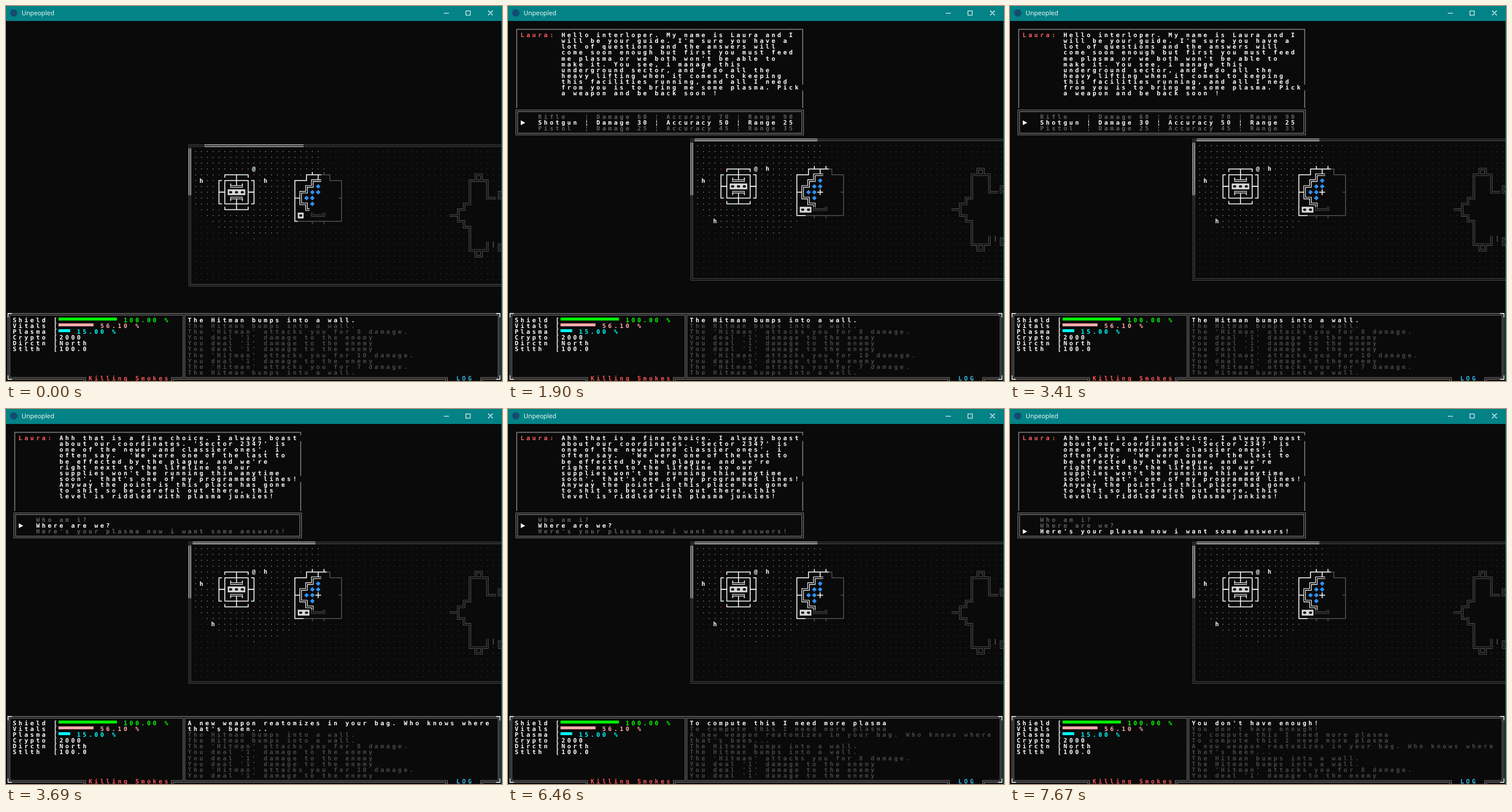
Write an HTML page that moves like this. It is 860x651 px and loops after 8 s.

```html
<!DOCTYPE html>
<html lang="en">
<head>
<meta charset="utf-8">
<title>Unpeopled</title>
<style>
  html, body { margin: 0; width: 100%; height: 100%; overflow: hidden; background: #0a0a0a; }
  svg { display: block; width: 860px; height: 651px; }
  text {
    font: bold 10.5px "DejaVu Sans Mono", "Liberation Mono", monospace;
    letter-spacing: 3.797px;
    white-space: pre;
    text-rendering: geometricPrecision;
  }
  .title { font: 11px "Open Sans", "Noto Sans", sans-serif; letter-spacing: 0; }
  path { fill: none; stroke-width: .15; }
  .wide { stroke-width: .4; }
  .gap { stroke-width: .18; stroke: #0a0a0a; }
  .white { stroke: #fff; }
  .dim { stroke: #505050; }
  .frame { stroke: #808080; }
  .gem { fill: #2f92f6; }
  .buttons { stroke: #fff; stroke-width: 1.1; }
</style>
</head>
<body>
<svg viewBox="0 0 860 651">
  <rect width="860" height="651" fill="#0a0a0a"/>
  <g id="map"></g>
  <g id="talk"></g>
  <g id="hud"></g>
  <g id="log"></g>
  <path d="M859.5 0V651" stroke="#038386" style="stroke-width:1"/>
  <rect width="860" height="26" fill="#038386"/>
  <circle cx="13.5" cy="12" r="6.3" fill="#164a70"/>
  <text class="title" x="27" y="16" fill="#fff">Unpeopled</text>
  <path class="buttons" d="M759 12.5H768M797.5 8.5H805V16H797.5ZM836 8L844 16M844 8L836 16"/>
</svg>
<script>
const CW = 860 / 85, CH = 626 / 62, TOP = 26, LOOP = 8000;
const PLAYER = [42, 25];
const BACK = "#0a0a0a";
const $ = id => document.getElementById(id);

// Inside grid() one unit is one cell, and whole numbers are cell centres.
const grid = body => `<g transform="translate(${CW / 2} ${TOP + 4.5}) scale(${CW} ${CH})">${body}</g>`;
const path = (cls, d) => `<path class="${cls}" d="${d}"/>`;
const double = (cls, d) => path(cls + " wide", d) + path("gap", d);
const rect = (x, y, w, h, fill) => `<rect x="${x}" y="${y}" width="${w}" height="${h}" fill="${fill}"/>`;
const dot = (c, r, size, fill) => rect(c - size / 2, r - size / 2, size, size, fill);
const text = (col, row, str, fill) =>
  `<text x="${(col * CW + 1.6).toFixed(2)}" y="${(TOP + row * CH + 8).toFixed(2)}" fill="${fill}">${str}</text>`;

const pages = [
  {
    lines: [
      "Hello interloper. My name is Laura and I",
      "will be your guide. I'm sure you have a",
      "lot of questions and the answers will",
      "come soon enough but first you must feed",
      "me plasma or we both won't be able to",
      "make it. You see, i manage this",
      "underground sector, and I do all the",
      "heavy lifting when it comes to keeping",
      "this facilities running, and all I need",
      "from you is to bring me some plasma. Pick",
      "a weapon and be back soon !"
    ],
    menu: [
      "Rifle   ¦ Damage 60 ¦ Accuracy 70 ¦ Range 90",
      "Shotgun ¦ Damage 30 ¦ Accuracy 50 ¦ Range 25",
      "Pistol  ¦ Damage 25 ¦ Accuracy 45 ¦ Range 35"
    ],
    edge: "V10.5M50 11.5V14.5"
  },
  {
    lines: [
      "Ahh that is a fine choice. I always boast",
      "about our coordinates. 'Sector 2347' is",
      "one of the newer and classier ones', i",
      "often say.  'We were one of the last to",
      "be effected by the plague, and we're",
      "right next to the lifeline so our",
      "supplies won't be running thin anytime",
      "soon', that's one of my programmed lines!",
      "Anyway the point is this place has gone",
      "to shit so be careful out there, this",
      "level is riddled with plasma junkies!"
    ],
    menu: ["Who am i?", "Where are we?", "Here's your plasma now i want some answers!"],
    edge: "V1.5M50 2.5V8.5M50 9.5V14.5"
  }
];

const bump = ["The Hitman bumps into a wall."];
const hit = ["You deal '1' damage to the enemy"];
const hurt = n => [`The 'Hitman' attacks you for ${n} damage.`];
const short = ["To compute this I need more plasma"];
const broke = ["You don't have enough!"];
const weapon = ["A new weapon reatomizes in your bag. Who knows where", "that's been..."];
// Newest entry first; "news" in the state counts how many of the first five are in.
const entries = [broke, broke, short, short, weapon,
  bump, bump, hurt(8), hit, hit, hit, hurt(10), hit, hurt(7), bump];

const steps = [
  [0, { moved: false, page: -1, pick: 0, news: 0 }],
  [130, { moved: true }],
  [560, { page: 0 }],
  [1900, { pick: 1 }],
  [2170, { pick: 2 }],
  [2420, { pick: 1 }],
  [2540, { pick: 0 }],
  [2980, { pick: 2 }],
  [3410, { pick: 1 }],
  [3690, { page: 1, news: 1 }],
  [5440, { pick: 0 }],
  [5720, { news: 2 }],
  [5990, { pick: 1 }],
  [6460, { news: 3 }],
  [6890, { pick: 2 }],
  [7140, { news: 4 }],
  [7670, { news: 5 }]
];

// True where a building stands instead of floor.
function solid(c, r) {
  if (c >= 36 && c <= 42 && r >= 25 && r <= 31) return true;
  if (c >= 49 && c <= 57 && r >= 26 && r <= 33) return true;
  if (c >= 51 && c <= 55 && r === 25) return true;
  const d = Math.abs(r - 32);
  if (d > 7) return false;
  if (d === 7) return c === 80 || c === 81;
  return c >= [76, 77, 78, 79, 79, 79, 79][d] && (d <= 4 || c <= 82);
}

function floor(shift) {
  let out = "";
  for (let r = 21; r <= 43; r++) {
    for (let c = 32; c <= 84; c++) {
      if (solid(c, r)) continue;
      const lit = Math.hypot(c - PLAYER[0], r + shift - PLAYER[1]) <= 12;
      out += dot(c, r, .13, lit ? "#a8a8a8" : "#383838");
    }
  }
  for (const c of [36, 42]) for (const r of [25, 31]) out += dot(c, r, .16, "#d02828");
  return out;
}

function barrels(c, r, n) {
  let out = rect(c - .5, r - .5, n, 1, "#d8d8d8");
  for (let i = 0; i < n; i++)
    out += `<ellipse cx="${c + i}" cy="${r}" rx=".27" ry=".21" fill="${BACK}"/>`;
  return out;
}

function generator() {
  const half = path("white", "M37 25.5V25H41V25.5M39 25V26.85M37 28V26H41V28" +
      "M36.5 26H36V28H37M41.5 26H42V28H41M38 26.5V27.2M40 26.5V27.2") +
    double("white", "M38 27H40");
  return half + `<g transform="translate(0 56) scale(1 -1)">${half}</g>` + barrels(38, 28, 3);
}

function vault(moved) {
  const right = moved ? 54.5 : 53.5, low = moved ? 50.5 : 49.5;
  const gems = [[53, 27], [52, 28], [53, 28], [51, 29], [52, 29], [52, 30]];
  return path("dim", `M${right} 25H55V26H57V33H${low}M57 29H56.5M52 33V33.5M54 33V33.5M54 25V24.5`) +
    double("dim", "M52 31.5V32H54V31.5") +
    path("white", `M${right} 25H51V26H49V33H${low}M52 25V24.5M49 29H49.85M53 25V25.85` +
      (moved ? "M54 25V24.5M52.5 29H53.5M53 28.5V29.5" : "")) +
    double("white", "M53.5 26H52V27H51V28H50V30H51V31" + (moved ? "H52V31.5" : "H51.5")) +
    gems.map(([c, r]) => path("gem", `M${c} ${r - .4}l.4 .4l-.4 .4l-.4 -.4z`)).join("") +
    barrels(50, 32, moved ? 2 : 1);
}

function ruin() {
  return double("dim", "M75.5 32H77M82 36.5V38H79V34H78V33H77V31H78V30H79V26H82V29H83.5" +
      "M80 26V25H81V26M80 38V39H81V38M85 28H84V29H85M85 37H84V38H85") +
    path("dim", "M83 36.5V37.5");
}

function drawMap({ moved }) {
  const shift = moved ? 0 : 1;
  const [a, b, end] = moved ? [31.5, 52.5, 29.5] : [33.5, 50.5, 28.5];
  const walls = double("dim", "M85 20H31V44H85") +
    double("white", `M${a} 20H${b}M31 20.5V${end}`);
  const foes = moved ? [[33, 27], [44, 25], [35, 34]] : [[33, 27], [44, 27]];
  const actors = [[...PLAYER, "@"], ...foes.map(f => [...f, "h"])];
  return grid(`<g transform="translate(0 ${shift})">` +
      floor(shift) + walls + generator() + vault(moved) + ruin() + "</g>" +
      actors.map(([c, r]) => dot(c, r, 1, BACK)).join("")) +
    actors.map(([c, r, ch]) => text(c, r, ch, "#fff")).join("");
}

function drawTalk({ page, pick }) {
  if (page < 0) return "";
  const { lines, menu, edge } = pages[page];
  return grid(path("frame", "M1 14.5V1H50" + edge) +
      double("frame", "M1 15H50V19H1Z") +
      `<path d="M1.7 ${15.65 + pick}l.75 .4l-.75 .4z" style="fill:#fff"/>`) +
    text(2, 2, "Laura:", "#ff5f5f") +
    lines.map((s, i) => text(9, 2 + i, s, "#fff")).join("") +
    menu.map((s, i) => text(5, 16 + i, s, i === pick ? "#fff" : "#606060")).join("");
}

function drawHud() {
  const bars = [
    ["Shield", 10, "100.00 %", "#00ff00"],
    ["Vitals", 6, "56.10 %", "#ffaaaa"],
    ["Plasma", 2, "15.00 %", "#00ffff"]
  ];
  const facts = ["Crypto [2000", "Dirctn [North", "Stlth  [100.0"];
  return grid(
      double("frame", "M13 61.5V61H0V50H84V61H81V61.5M28 61.5V61H75V61.5M30 50V61") +
      path("white", "M-.15 50.5V49.85H.5M83.5 49.85H84.15V50.5" +
        "M-.15 60.5V61.15H.5M83.5 61.15H84.15V60.5")) +
    bars.map(([name, cells, value, color], i) =>
      text(1, 51 + i, name + " [", "#fff") +
      rect(9 * CW, TOP + (51 + i) * CH, cells * CW, 5, color) +
      text(cells + 10, 51 + i, value, color)).join("") +
    facts.map((s, i) => text(1, 54 + i, s, "#fff")).join("") +
    text(14, 61, "Killing Smokes", "#ff5555") + text(77, 61, "LOG", "#38bdf0");
}

function drawLog({ news }) {
  const shown = entries.slice(5 - news);
  const fresh = shown[0].length;
  return shown.flat().slice(0, 10)
    .map((s, i) => text(31, 51 + i, s, i < fresh ? "#fff" : "#484848")).join("");
}

let last = -1;
function tick() {
  const t = performance.now() % LOOP;
  const past = steps.filter(([at]) => at <= t);
  if (past.length !== last) {
    last = past.length;
    const state = Object.assign({}, ...past.map(s => s[1]));
    $("map").innerHTML = drawMap(state);
    $("talk").innerHTML = drawTalk(state);
    $("log").innerHTML = drawLog(state);
  }
  requestAnimationFrame(tick);
}
$("hud").innerHTML = drawHud();
tick();
</script>
</body>
</html>
```
